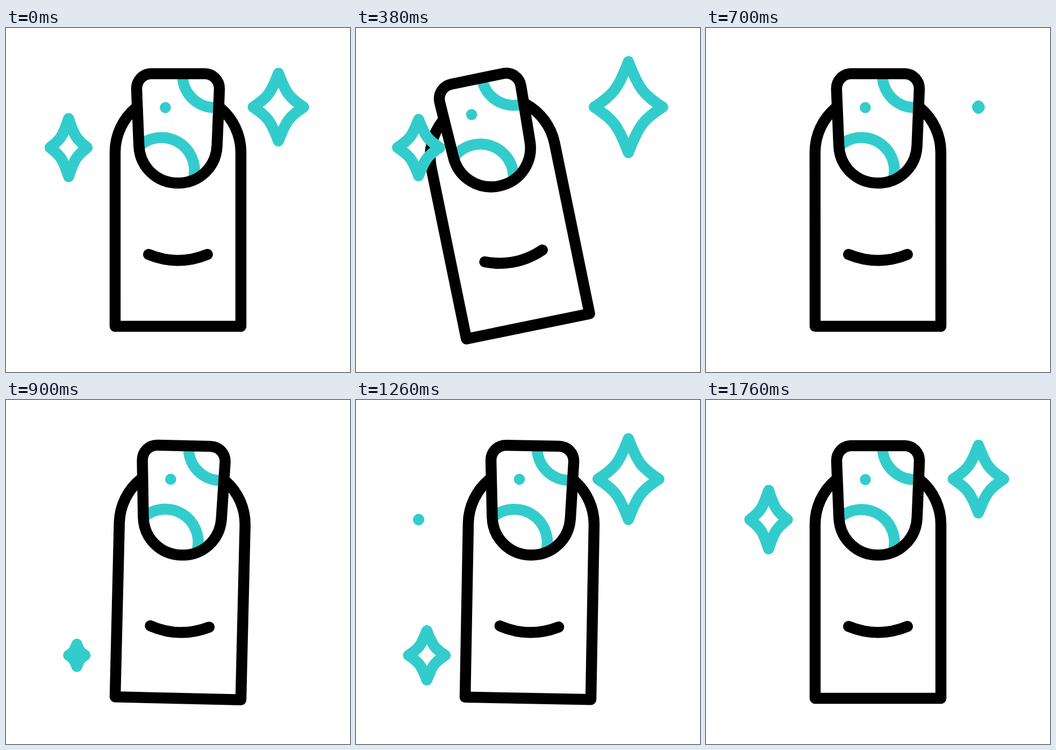
Animation of 640 by 640 pixels, one loop 2.4 s. Source, as an HTML page:

```html
<!DOCTYPE html>
<html lang="en">
<head>
<meta charset="utf-8">
<title>Nail polish</title>
<style>
  html, body { margin: 0; width: 100%; height: 100%; overflow: hidden; background: #fff; }
  svg { display: block; width: 100%; height: 100%; }
  path { fill: none; stroke: #000; stroke-width: 20.5; stroke-linecap: round; stroke-linejoin: round; }
  .teal { stroke: #3cc; }
  .butt { stroke-linecap: butt; }
  circle { fill: #3cc; }
</style>
</head>
<body>
<svg viewBox="0 0 640 640">
  <g id="finger">
    <path d="M241 149A108 108 0 0 0 203 231V555H437V231A108 108 0 0 0 399 149"/>
    <path d="M265.3 421.3Q320 443.7 374.7 421.3"/>
    <circle cx="296.5" cy="148" r="10.3"/>
    <path class="teal butt" d="M328.5 86A60 60 0 0 0 390 148"/>
    <path class="teal butt" d="M248 219.5A61.5 61.5 0 0 1 349.5 277"/>
    <path d="M271 85H369C385.5 85 397.7 98 397 114.5L392.7 219C391 258 360 288.5 320 288.5S249 258 247.3 219L243 114.5C242.3 98 254.5 85 271 85Z"/>
  </g>
  <g id="stars"></g>
</svg>
<script>
const LOOP = 2400, STEP = 20;
const LEAN = 533, SWING = 250;         // ms to lean left, ms per swing back
const swings = [-14.5, 5, -3, 1.15, 0]; // degrees at the end of each swing

// Each star is largest at its two peaks, gone between them and at rest outside
const stars = [
  { x: 116.5, y: 222.5, full: [64.5, 86], rest: [34.5, 54], peaks: [267, 1514], beat: 265 },
  { x: 506.8, y: 147.2, full: [64.8, 86], rest: [47, 63], peaks: [426, 1327], beat: 303 },
  { x: 131.8, y: 475, full: [63.5, 85], rest: [0, 0], peaks: [1112, 1112], beat: 312 }
];

const smooth = u => u * u * (3 - 2 * u);
const mix = (a, b, u) => a + (b - a) * u;

function tilt(t) {
  if (t < LEAN) return swings[0] * smooth(t / LEAN);
  const n = (t - LEAN) / SWING, i = Math.floor(n);
  return i < swings.length - 1 ? mix(swings[i], swings[i + 1], smooth(n - i)) : 0;
}

function starSize({ full, rest, peaks: [first, last], beat }, t) {
  const gap = Math.min(Math.abs(t - first), Math.abs(t - last));
  const swell = smooth(Math.max(0, 1 - gap / beat));
  const resting = t < first || t > last;
  return full.map((size, i) => mix(resting ? rest[i] : 0, size, swell));
}

// Four-pointed star with concave sides, built from one mirrored curve
function starPath(w, h) {
  const cx = 0.301 * w, cy = 0.408 * h, dx = 0.431 * w, dy = 0.277 * h;
  return `M0 ${-h}C${cx} ${-cy} ${dx} ${-dy} ${w} 0` +
    `C${dx} ${dy} ${cx} ${cy} 0 ${h}` +
    `C${-cx} ${cy} ${-dx} ${dy} ${-w} 0` +
    `C${-dx} ${-dy} ${-cx} ${-cy} 0 ${-h}Z`;
}

const finger = document.getElementById("finger");
const layer = document.getElementById("stars");
for (const s of stars) {
  s.el = document.createElementNS("http://www.w3.org/2000/svg", "path");
  s.el.setAttribute("class", "teal");
  s.el.setAttribute("transform", `translate(${s.x} ${s.y})`);
  layer.append(s.el);
}

function draw(t) {
  finger.setAttribute("transform", `rotate(${tilt(t)} 320 555)`);
  for (const s of stars) {
    const [w, h] = starSize(s, t);
    s.el.setAttribute("d", w > 0 ? starPath(w, h) : "");
  }
}

const start = performance.now();
function tick() {
  const t = (performance.now() - start) % LOOP;
  draw(Math.floor(t / STEP) * STEP);
  requestAnimationFrame(tick);
}
tick();
</script>
</body>
</html>
```
